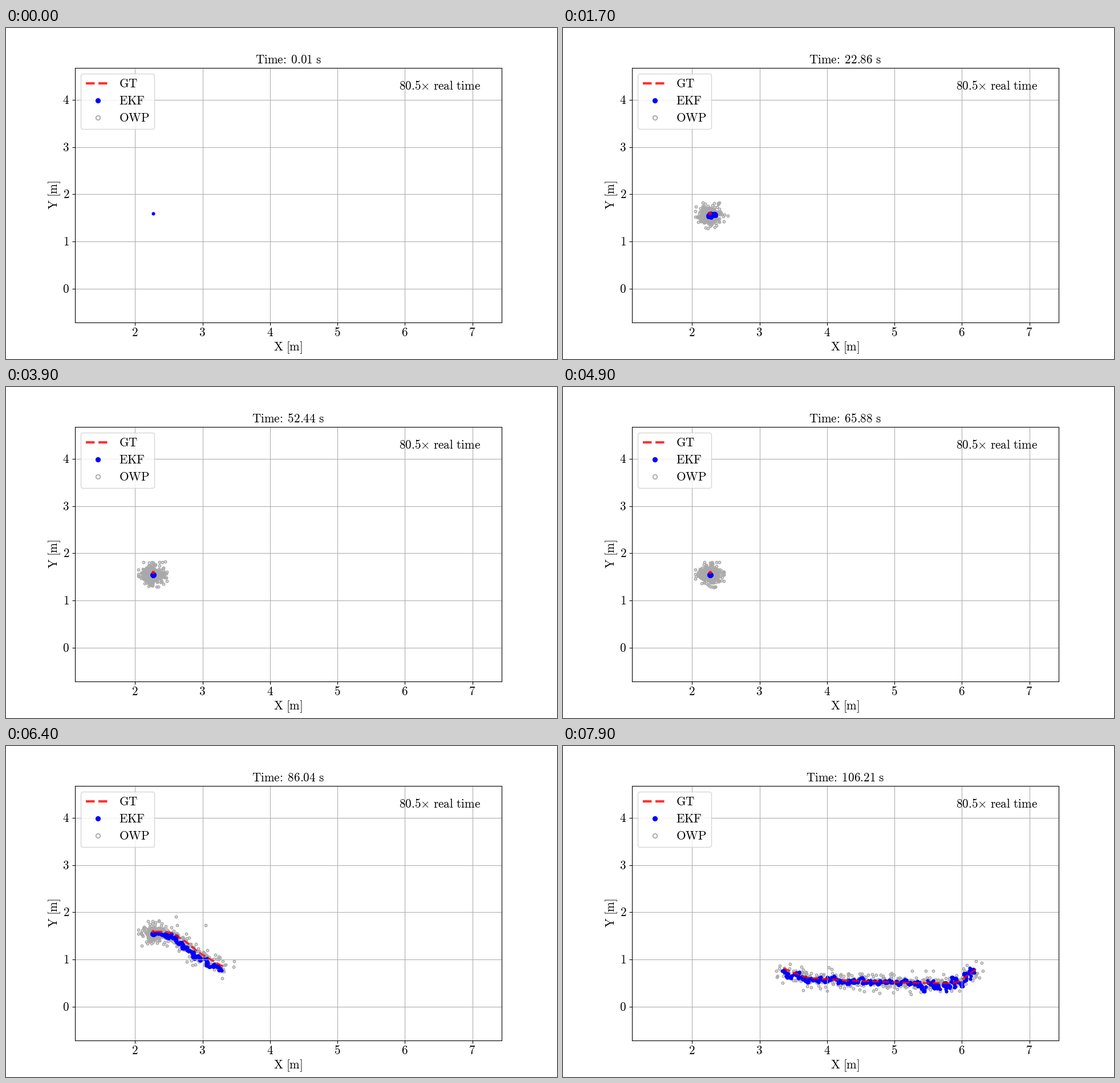
Animation of 966 by 580 pixels, one loop 8 s. Source, as a matplotlib script:

```python
import numpy as np
import matplotlib.pyplot as plt
from matplotlib.animation import FuncAnimation
from matplotlib.patches import FancyBboxPatch

W, H, DPI = 966, 580, 100
FRAMES, STEP, WINDOW = 80, 1.34428, 20
X0, DX, Y0, DY = 226.45 - 2 * 118.25, 118.25, 456.85, 82.7
GRAY = "#a9a9a9"
plt.rcParams["mathtext.fontset"] = "cm"

rng = np.random.default_rng(5)
t = np.arange(0, 107, 0.05)
moving = t > 77


def to_data(p):
    """Stage pixels to axis units."""
    return np.array([(p[0] - X0) / DX, (Y0 - p[1]) / DY])


def smooth(v, n=31):
    v = np.pad(v, n // 2, mode="reflect", reflect_type="odd")
    return np.convolve(v, np.ones(n) / n, "valid")


# Ground truth: rest, then a drive at nearly constant speed
knots = np.array([(258, 325), (290, 326), (325, 350), (336, 361), (383, 388),
                  (425, 406), (500, 411), (612, 415), (690, 416), (724, 391)])
arc = np.r_[0, np.cumsum(np.hypot(*np.diff(knots, axis=0).T))]
grid = np.linspace(0, arc[-1], 600)
dist = np.interp(t, [77, 86.04, 99.49, 106.21], arc[[0, 4, 7, 9]])
gt = np.array([np.interp(dist, grid, smooth(np.interp(grid, arc, k)))
               for k in knots.T])
gt += np.where(moving, 0, 0.4) * rng.normal(size=gt.shape)

# Filter estimate: settles, trails in the bend, gets rougher at the end
drift = np.array([
    18 * np.exp(-t / 4.5) * np.sin(0.45 * t)
    + np.interp(t, [77, 82, 86, 90], [0, -5, -5, 0]),
    4 * (1 - np.exp(-(t / 5) ** 2))
    + np.interp(t, [79, 83, 86, 91], [0, 3, 2, -3])])
kernel = np.hanning(11)
kernel /= np.sqrt(np.sum(kernel ** 2))
noise = np.array([np.convolve(rng.normal(size=t.size), kernel, "same")
                  for _ in (0, 1)])
noise += 0.35 * rng.normal(size=gt.shape)
rough = np.interp(t, [0, 1, 10, 20, 77, 79, 99, 101],
                  [0, 1.5, 1.3, 0.6, 0.6, 2.5, 2.8, 6])
ekf = gt + drift + noise * [np.minimum(rough, 3), rough]

# Raw position fixes: wide scatter, now and then a stray up and right
spread = np.where(moving, [[8], [6.5]], [[7.5], [6.5]])
bias = np.where(moving, 0.6 * drift, [[-1], [3.5]])
owp = gt + bias + spread * np.clip(rng.standard_t(7, gt.shape), -3.3, 3.3)
stray = rng.random(t.size) < 0.012
owp += stray * rng.exponential([[20], [8]], gt.shape) * [[1], [-1]]

gt, ekf, owp = map(to_data, (gt, ekf, owp))

# Plot area
fig = plt.figure(figsize=(W / DPI, H / DPI), dpi=DPI, facecolor="white")
ax = fig.add_axes([0.125, 0.11, 0.775, 0.77])
left, bottom = to_data((0.125 * W, 0.89 * H))
right, upper = to_data((0.9 * W, 0.12 * H))
ax.set(xlim=(left, right), ylim=(bottom, upper),
       xticks=range(2, 8), yticks=range(5))
ax.tick_params(labelbottom=False, labelleft=False)
ax.grid(True)

ring = dict(ls="", marker="o", mfc="none", mec=GRAY)
dot = dict(ls="", marker="o", color="blue")
dash = dict(ls="--", color="red", alpha=0.8)
owp_dots, = ax.plot([], [], ms=2.9, mew=1.3, zorder=1, **ring)
ekf_dots, = ax.plot([], [], ms=3.4, zorder=1.1, **dot)
gt_line, = ax.plot([], [], lw=2.4, zorder=2, **dash)

# Overlay in pixels for text and legend
top = fig.add_axes([0, 0, 1, 1])
top.set(xlim=(0, W), ylim=(H, 0))
top.axis("off")


def tex(s):
    body = r"\ ".join(r"\text{%s}" % w for w in s.split())
    body = body.replace("×}", r"}{\times}").replace(r":}\ ", r":}\ \hspace{0.14}")
    return f"${body}$"


def put(x, y, s, ha="center", **kw):
    return top.text(x, y, tex(s), ha=ha, va="baseline", fontsize=15.25, **kw)


for n in range(2, 8):
    put(X0 + DX * n - 0.4, 540.4, str(n))
for n in range(5):
    put(111, Y0 - DY * n + 6.9, str(n), "right")
put(494.7, 565.6, "X [m]")
put(90, 293, "Y [m]", rotation=90, rotation_mode="anchor")
put(688.6, 108, "80.5× real time", "left")
title = put(494.7, 61.5, "Time: 0.01 s")

top.add_patch(FancyBboxPatch(
    (131.5, 80.5), 129, 97, boxstyle="round,pad=0,rounding_size=4.2",
    fc="white", ec="0.8", lw=1, alpha=0.8))
top.plot([139.5, 181.2], [96.6, 96.6], lw=3, dash_capstyle="butt", **dash)
top.plot(161, 127, ms=5.6, **dot)
top.plot(161, 156.8, ms=5.4, mew=1.3, **ring)
for k, name in enumerate(("GT", "EKF", "OWP")):
    put(198.3, 104.3 + 29.7 * k, name, "left")


def draw(i):
    now = 0.01 + STEP * i
    seen = (t <= now) & (t > now - WINDOW)
    gt_line.set_data(*gt[:, seen])
    ekf_dots.set_data(*ekf[:, seen])
    owp_dots.set_data(*owp[:, seen & (t > 0)])
    title.set_text(tex(f"Time: {now:.2f} s"))
    return gt_line, ekf_dots, owp_dots, title


anim = FuncAnimation(fig, draw, frames=FRAMES, interval=100,
                     repeat=True, repeat_delay=0, blit=False)
plt.show()
```
